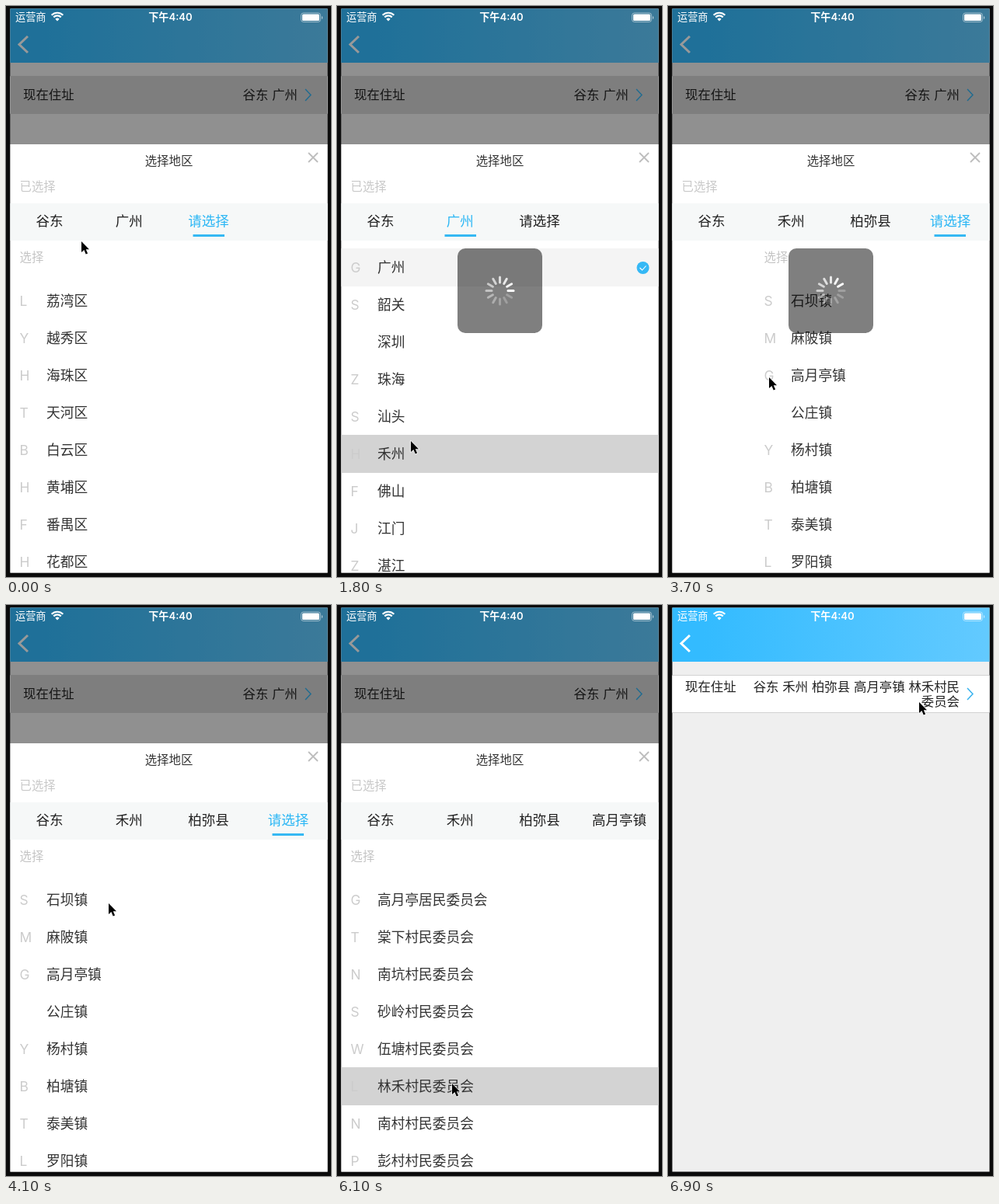
Write an HTML page that moves like this. It is 418 by 735 pixels and loops after 7 s.

```html
<!DOCTYPE html>
<html lang="zh-CN">
<head>
<meta charset="utf-8">
<title>选择地区</title>
<style>
  html, body { margin: 0; width: 100%; height: 100%; overflow: hidden; background: #0b0b0b; }
  svg { display: block; width: 418px; height: 735px; }
  text { font-family: "Noto Sans CJK SC", "Noto Sans CJK", "Noto Sans SC", sans-serif; }
  .latin { font-family: Inter, "Noto Sans CJK SC", "Noto Sans CJK", sans-serif; }
</style>
</head>
<body>
<svg viewBox="0 0 418 735" xmlns="http://www.w3.org/2000/svg">
  <defs>
    <linearGradient id="bar"><stop offset=".1" stop-color="#33bbff"/><stop offset="1" stop-color="#63caff"/></linearGradient>
    <clipPath id="phone"><rect x="5.5" y="3.5" width="408" height="726"/></clipPath>
    <clipPath id="list"><rect x="5" y="302" width="409" height="428"/></clipPath>
  </defs>
  <rect width="418" height="735" fill="#0b0b0b"/>
  <g id="screen" clip-path="url(#phone)"></g>
  <g id="cursor">
    <path d="M0 0V14L3.4 11L5.7 16.6L8.1 15.6L5.8 10.2H10Z" fill="#000" stroke="#fff" stroke-width="1.2" paint-order="stroke"/>
  </g>
</svg>
<script>
const LOOP = 7000, STEP = 100, WIDTH = 409, PITCH = 48;
const BLUE = '#2db7f5';
const ASK = '请选择';
const PATH = ['谷东', '禾州', '柏弥县', '高月亭镇', '林禾村民委员会'];

const parse = s => s.split(' ').map(r => /^([A-Z]?)(.+)$/.exec(r).slice(1));
const committee = s => parse(s).map(([k, n]) => [k, n + '村民委员会']);
const provinces = parse(`G${PATH[0]} 甘肃 S四川 G贵州 H海南 Y云南 Q青海 S陕西 G广西`);
const cities = parse(`G广州 S韶关 深圳 Z珠海 S汕头 H${PATH[1]} F佛山 J江门 Z湛江`);
const firstDistricts = parse('L荔湾区 Y越秀区 H海珠区 T天河区 B白云区 H黄埔区 F番禺区 H花都区');
const districts = parse(`H惠城区 惠阳区 B${PATH[2]} H惠东县 L龙门县`);
const towns = parse(`S石坝镇 M麻陂镇 G${PATH[3]} 公庄镇 Y杨村镇 B柏塘镇 T泰美镇 L罗阳镇`);
const villages = [['G', '高月亭居民委员会'], ...committee('T棠下 N南坑 S砂岭 W伍塘 L林禾 N南村 P彭村')];

// start, page, duration of the underline move
const moves = [[-999, 2, 1], [300, 0, 200], [1000, 1, 200], [1900, 2, 0], [3500, 3, 0], [5300, 4, 0]];
const loads = [1900, 3500, 5300];
// from, to, page, row
const presses = [[1700, 2100, 1, 5], [3300, 3700, 2, 2], [5000, 5500, 3, 2], [6000, LOOP, 4, 5]];
const waits = [[1800, 2300], [3400, 3900], [5100, 5600]];
const CLOSE = 6200;
const trail = [
  [0, 97, 303], [300, 60, 284], [500, 60, 284], [900, 144, 279], [1400, 144, 279],
  [1700, 95, 560], [2300, 95, 560], [2800, 128, 287], [2900, 128, 287], [3300, 130, 478],
  [3900, 130, 478], [4100, 132, 384], [4200, 132, 384], [4900, 127, 480], [5500, 127, 480],
  [5900, 148, 616], [6200, 148, 616], [6800, 323, 125], [LOOP, 323, 125]
];

const clamp = v => Math.max(0, Math.min(1, v));
const smooth = v => { v = clamp(v); return v * v * (3 - 2 * v); };
const lerp = (a, b, v) => a + (b - a) * v;
const within = (t, a, b) => t >= a && t < b;

// y is the middle of the glyphs
function label(s, x, y, size, fill, extra = '') {
  return `<text x="${x}" y="${y + size * .36}" font-size="${size}" fill="${fill}" ${extra}>${s}</text>`;
}
const box = (x, y, w, h, fill, extra = '') =>
  `<rect x="${x}" y="${y}" width="${w}" height="${h}" fill="${fill}" ${extra}/>`;
const line = (d, color, w, extra = '') =>
  `<path d="${d}" fill="none" stroke="${color}" stroke-width="${w}" ${extra}/>`;
const MID = 'text-anchor="middle"', END = 'text-anchor="end"';

function travel(t, span) {
  let pos = 2;
  for (const m of moves) {
    const d = span || m[2];
    if (t >= m[0]) pos = d ? lerp(pos, m[1], smooth((t - m[0]) / d)) : m[1];
  }
  return pos;
}

function home(t) {
  const done = t >= CLOSE, y = done ? 105 : 114.5;
  const space = ' style="word-spacing:1.2px"';
  const value = done
    ? label(PATH.slice(0, 4).join(' ') + ' ' + PATH[4].slice(0, 4), 375, 105, 16.4, '#222', END + space) +
      label(PATH[4].slice(4), 375, 124, 16.4, '#222', END)
    : label(PATH[0] + ' 广州', 375, y, 16.4, '#222', END + space);
  return box(5, 3, WIDTH, 727, '#efefef') + box(5, 3, WIDTH, 70, 'url(#bar)') +
    line('M28 39L17 49.5L28 60', '#fff', 3) +
    box(5, 90, WIDTH, 49, '#d2d2d2') + box(5, 91, WIDTH, 47, done ? '#fff' : '#d2d2d2') +
    label('现在住址', 22, y, 16.4, '#222') + value +
    line('M385 107L392 114.5L385 122', '#37b2ee', 1.5);
}

function statusBar() {
  const arc = r => line(`M${66 - r * .72} ${19 - r * .7}A${r} ${r} 0 0 1 ${66 + r * .72} ${19 - r * .7}`, '#fff', 2.2);
  return label('运营商', 12, 14.5, 13.2, '#fff') + arc(10.2) + arc(6.6) +
    '<path d="M66 19.6L63.4 16.8A3.6 3.6 0 0 1 68.6 16.8Z" fill="#fff"/>' +
    label('下午4:40', 211.5, 14.5, 13.1, '#fff', MID + ' class="latin" font-weight="600"') +
    box(379.5, 9, 25, 11.5, 'none', 'rx="3" stroke="#fff" stroke-opacity=".5"') +
    box(381, 10.5, 22, 8.5, '#fff', 'rx="1.5"') +
    '<path d="M406 13A2.2 2.2 0 0 1 406 17Z" fill="#fff" fill-opacity=".6"/>';
}

function tabs(t) {
  const stage = loads.filter(s => s < t).length;
  const names = stage ? [...PATH.slice(0, stage + 1), ASK] : [PATH[0], '广州', ASK];
  const active = moves.filter(m => m[0] < t).pop()[1];
  const fading = loads.includes(t);
  const items = names.map((n, i) => label(n, 56 + i * 102.3, 277, 17.5, i === active ? BLUE : '#222',
    MID + (fading && i === active ? ' opacity=".3"' : ''))).join('');
  return box(5, 254, WIDTH, 48, '#f6f8f8') + items +
    box(36.5 + travel(t) * 102, 294, 40.5, 3, '#35b8f3');
}

function page(rows, index, t) {
  const picked = index < 2;
  const shift = picked ? 43 : 0;
  const press = presses.find(p => p[2] === index && within(t, p[0], p[1]));
  return label('选择', 17.5, 323.5 - shift, 15.4, '#c4c4c4') + rows.map(([key, name], i) => {
    const y = 379.5 - shift + i * PITCH;
    const down = press && press[3] === i, chosen = picked && i === 0;
    const back = down || chosen ? box(5, y - 24.5, WIDTH, 49, down ? '#d3d3d3' : '#f4f4f4') : '';
    const check = chosen
      ? `<circle cx="393.5" cy="${y + .5}" r="8" fill="#35b8f5"/>` + line(`M389.5 ${y + .5}l3 3l5 -5.5`, '#fff', 1.1)
      : '';
    return back + label(key, 17.5, y, 17.4, '#ccc', 'class="latin"') + label(name, 52, y, 17.7, '#333') + check;
  }).join('');
}

function spinner(t) {
  const lead = 9 + Math.round((t - 5300) * 12 / 1000);
  let spokes = '';
  for (let i = 0; i < 12; i++) {
    const age = ((lead - i) % 12 + 12) % 12;
    spokes += line('M0 -10.5V-17.5', '#fff', 3,
      `stroke-linecap="round" opacity="${Math.max(.25, 1 - age * .08)}" transform="translate(209.5 366.5) rotate(${i * 30})"`);
  }
  return box(155, 312, 109, 109, '#000', 'rx="10" fill-opacity=".5"') + spokes;
}

function sheet(t, drop) {
  const at = travel(t, 300);
  const lists = [provinces, cities, t < loads[0] ? firstDistricts : districts, towns, villages];
  const pages = lists.map((rows, i) => Math.abs(i - at) < 1
    ? `<g transform="translate(${(i - at) * WIDTH})">${page(rows, i, t)}</g>` : '').join('');
  return `<g transform="translate(0 ${drop * 560})">` + box(5, 178, WIDTH, 552, '#fff') +
    label('选择地区', 209.5, 199.5, 15.4, '#333', MID) +
    line('M389 189L401 201M401 189L389 201', '#bdbdbd', 1.8) +
    label('已选择', 17.5, 232, 15.4, '#c8c8c8') +
    `<g clip-path="url(#list)">${pages}</g>` + tabs(t) +
    (waits.some(w => within(t, ...w)) ? spinner(t) : '') + '</g>';
}

function draw(t) {
  const drop = smooth((t - CLOSE + 100) / 400);
  document.getElementById('screen').innerHTML = home(t) +
    box(5, 3, WIDTH, 727, '#000', `fill-opacity="${.4 * (1 - drop)}"`) +
    statusBar() + (drop < 1 ? sheet(t, drop) : '');
  const i = trail.findIndex(k => k[0] > t);
  const a = trail[i - 1], b = trail[i];
  const v = smooth((t - a[0]) / (b[0] - a[0]));
  document.getElementById('cursor').setAttribute('transform',
    `translate(${lerp(a[1], b[1], v)} ${lerp(a[2], b[2], v)})`);
}

let shown = -1;
function tick() {
  const t = Math.floor(performance.now() % LOOP / STEP) * STEP;
  if (t !== shown) draw(shown = t);
  requestAnimationFrame(tick);
}
tick();
</script>
</body>
</html>
```
